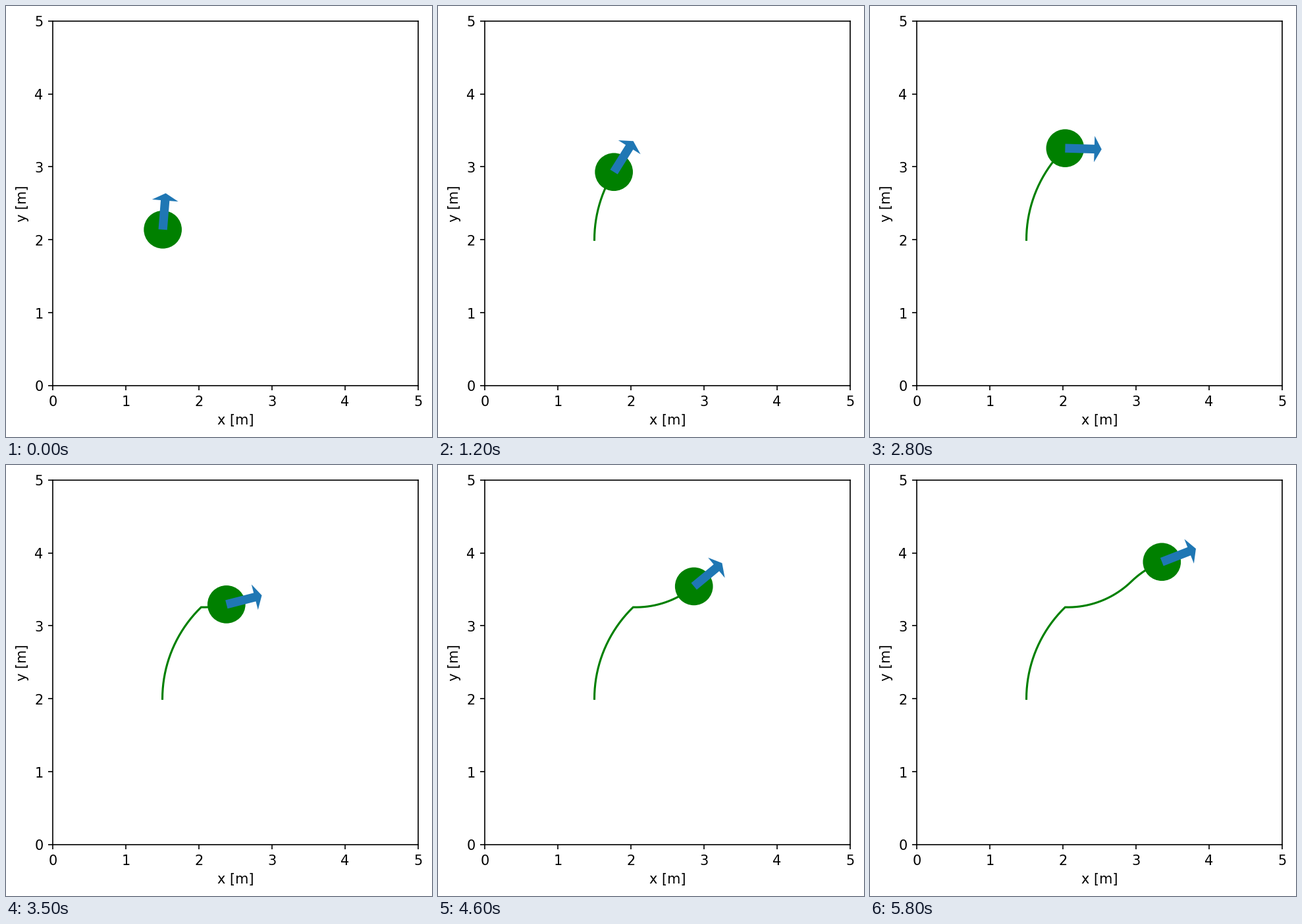
Recreate the animation shown at these times as a matplotlib script. Size 647 px wide and 655 px high, loop 5.9 s.

```python
import numpy as np
import matplotlib.pyplot as plt
from matplotlib.animation import FuncAnimation
from matplotlib.patches import Arrow, Circle
from matplotlib.transforms import Affine2D, ScaledTranslation

W, H, DPI = 647, 655, 150
LEFT, BOTTOM, SIDE = 71.2, 77.92, 554.4
DT = 0.1
FRAMES = 59


def command(step):
    """Speed in m/s and turn rate in rad/s."""
    if step < 20:
        return 0.7, -0.4
    if step < 30:
        return 0.0, -0.8      # turn on the spot
    if step < 50:
        return 0.5, 0.4
    return 0.5, -0.4


def move(x, y, a, v, w):
    """Advance one time step along a circular arc."""
    b = a + w * DT
    r = v / w
    return x + r * (np.sin(b) - np.sin(a)), y + r * (np.cos(a) - np.cos(b)), b


def drive(steps):
    poses = [(1.5, 2.0, np.pi / 2)]
    for step in range(steps):
        poses.append(move(*poses[-1], *command(step)))
    return np.array(poses)


poses = drive(FRAMES + 1)

fig = plt.figure(figsize=((W + 1e-6) / DPI, (H + 1e-6) / DPI), dpi=DPI,
                 facecolor="white")
ax = fig.add_axes([LEFT / W, BOTTOM / H, SIDE / W, SIDE / H])
ax.set(xlim=(0, 5), ylim=(0, 5), xticks=range(6), yticks=range(6),
       xlabel="x [m]", ylabel="y [m]")

# Sub-pixel nudge so the tick labels round to the right rows
nudge = ScaledTranslation(0, -0.36 / DPI, fig.dpi_scale_trans)
for label in ax.get_yticklabels():
    label.set_transform(label.get_transform() + nudge)

trail, = ax.plot([], [], color="green", lw=1.5, zorder=1)
body = ax.add_patch(Circle((0, 0), 0.26, fc="green", ec="none", zorder=2))
arrow = ax.add_patch(Arrow(0, 0, 0.5, 0, width=0.6, fc="C0", ec="none",
                           zorder=3))


def update(i):
    k = i + 2
    x, y, a = poses[k]
    trail.set_data(poses[:k + 1, 0], poses[:k + 1, 1])
    body.center = x, y
    arrow.set_transform(Affine2D().rotate(a).translate(x, y) + ax.transData)
    return trail, body, arrow


anim = FuncAnimation(fig, update, frames=FRAMES, interval=100,
                     repeat=True, repeat_delay=0, blit=False)
plt.show()
```
